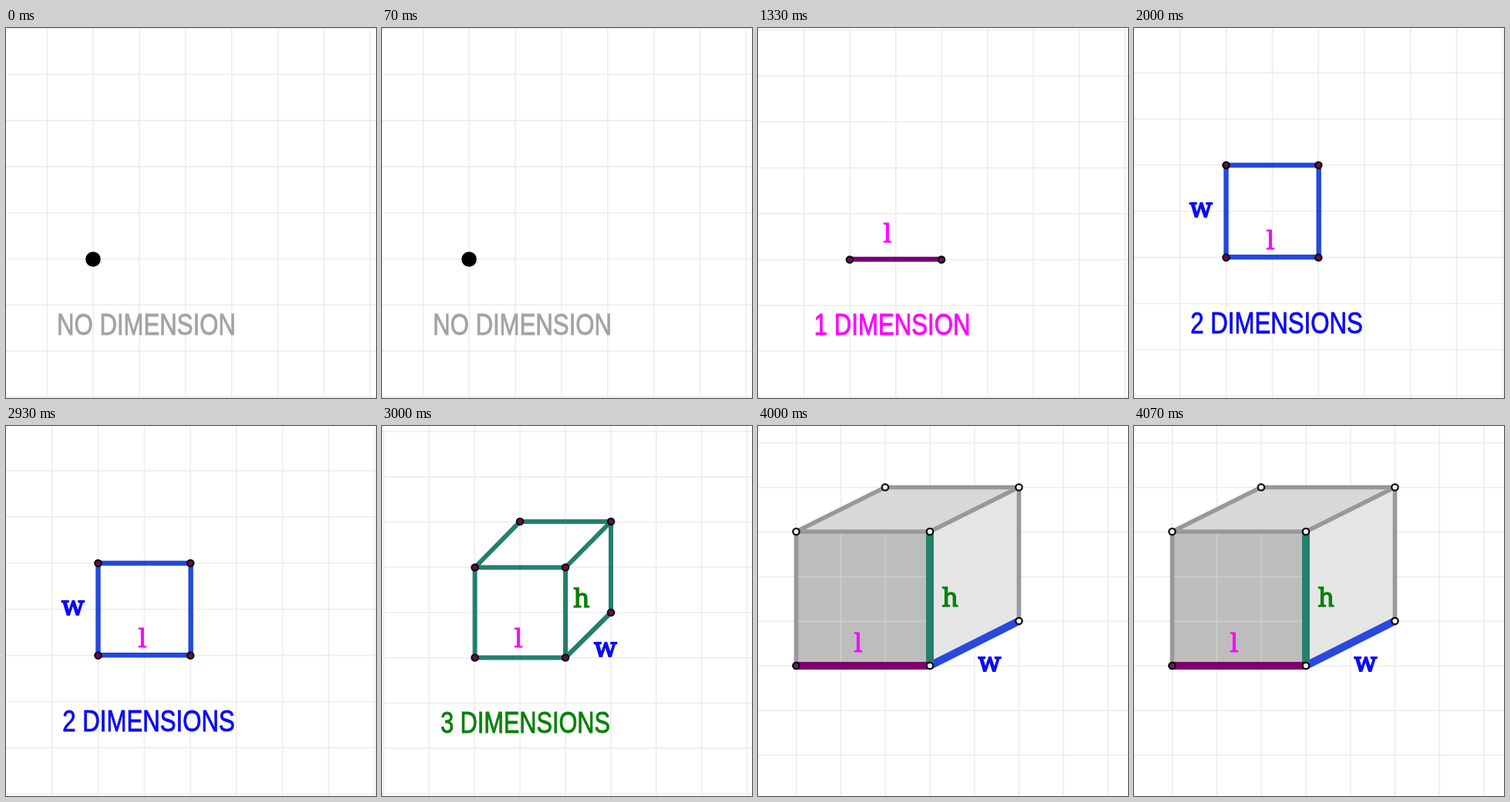
An HTML page that plays this animation: 480 px wide and 480 px high, repeating every 4990 ms.

```html
<!DOCTYPE html>
<html lang="en">
<head>
<meta charset="utf-8">
<title>Dimensions</title>
<style>
  html, body { margin: 0; width: 100%; height: 100%; overflow: hidden; background: #fff; }
  svg { display: block; width: 100%; height: 100%; }
  .slide {
    visibility: hidden;
    animation: turn 4990ms step-end infinite;
    animation-delay: calc(var(--start) - 4990ms);
  }
  @keyframes turn {
    0% { visibility: visible; }
    20.04008%, 100% { visibility: hidden; }
  }
  .grid { stroke: #ededed; stroke-width: 1.6; fill: none; }
  .edge { fill: none; stroke-linecap: round; stroke-linejoin: round; }
  .caption { font-family: "Liberation Sans", Arial, sans-serif; stroke-width: .9; }
  .label { font-family: "Noto Serif", serif; text-anchor: middle; }
</style>
</head>
<body>
<svg id="stage" viewBox="0 0 480 480"></svg>
<script>
const stage = document.getElementById('stage');
const MAGENTA = '#ff00ff', BLUE = '#0c0cf4', GREEN = '#088008';
const PURPLE = '#780070', ROYAL = '#2448de', TEAL = '#23806c', GRAY = '#989898';
const PLUM = '#6c0a4c';

function grid(x0, y0, dx, dy) {
  let d = '';
  for (let x = x0; x < 480; x += dx) d += `M${x} 0V480`;
  for (let y = y0; y < 480; y += dy) d += `M0 ${y}H480`;
  return `<path class="grid" d="${d}"/>`;
}

const edge = (d, color, width) =>
  `<path class="edge" d="${d}" stroke="${color}" stroke-width="${width}"/>`;

const face = (d, color) => `<path d="${d}" fill="${color}"/>`;

const dots = (points, fill) => points.map(([x, y]) =>
  `<circle cx="${x}" cy="${y}" r="4.2" fill="${fill}" stroke="#0a0a0a" stroke-width="2.2"/>`).join('');

// Captions share one condensed, slightly heavy lettering style.
const caption = (text, x, y, size, color) =>
  `<text class="caption" transform="translate(${x} ${y}) scale(.81 1)" font-size="${size}" fill="${color}" stroke="${color}">${text}</text>`;

const label = (text, x, y, size, color, weight) =>
  `<text class="label" x="${x}" y="${y}" font-size="${size}" fill="${color}" stroke="${color}" stroke-width="${weight}">${text}</text>`;

const length = (x, y) => label('l', x, y, 33.5, MAGENTA, .9);
const width = (x, y) => label('w', x, y, 33.5, BLUE, 1.9);
const height = (x, y) => label('h', x, y, 33, GREEN, 1.3);

const corners = (l, r, back, end, top, bottom, rear, low) =>
  [[l, top], [r, top], [back, rear], [end, rear], [end, low], [r, bottom], [l, bottom]];

const cube = corners(120.5, 238, 179, 297, 183.5, 300.5, 124, 242);
const box = corners(49.5, 223, 165, 338.5, 137, 311, 79.5, 253);

const slides = [
  grid(53.3, .5, 59.87, 59.8) +
    '<circle cx="113" cy="300" r="9.8"/>' +
    caption('NO DIMENSION', 66, 398, 38.5, '#a3a3a3'),

  grid(59.8, 2.7, 59.5, 59.55) +
    edge('M119 300H238', PURPLE, 6.4) +
    dots([[119, 300.5], [238, 300.5]], '#5c1450') +
    length(168, 278) +
    caption('1 DIMENSION', 72.8, 398, 38.5, MAGENTA),

  grid(60, 58, 59.75, 59.9) +
    edge('M119.5 178H239.7V297.2H119.5Z', ROYAL, 6.4) +
    dots([[119.5, 178], [239.3, 178], [239.3, 297.7], [119.5, 297.7]], PLUM) +
    length(177, 287) + width(87, 245) +
    caption('2 DIMENSIONS', 73.3, 396, 38.5, BLUE),

  grid(2.3, 7.2, 58.9, 58.7) +
    edge('M120.5 183.5H238V300.5H120.5ZL179 124H297V242L238 300.5M238 183.5L297 124', TEAL, 6) +
    dots(cube, PLUM) +
    length(177, 287) + height(259, 235) + width(290, 299) +
    caption('3 DIMENSIONS', 76, 398, 37.9, GREEN),

  grid(49.8, 21.8, 57.75, 57.9) +
    face('M49.5 137H223V311H49.5Z', '#bdbdbd') +
    face('M49.5 137L165 79.5H338.5L223 137Z', '#d8d8d8') +
    face('M223 137L338.5 79.5V253L223 311Z', '#e5e5e5') +
    '<path d="M107.5 137V311M165 137V311M49.5 195.5H223M49.5 253.5H223" stroke="#cecece" stroke-width="1.5"/>' +
    edge('M49.5 311V137H223L338.5 79.5V253M49.5 137L165 79.5H338.5', GRAY, 5.6) +
    edge('M223 311L338.5 253', '#2a48de', 10) +
    edge('M223 137V311', TEAL, 10) +
    edge('M49.5 311H223', '#80006e', 10) +
    dots(box.slice(0, 6), '#f0f0f0') + dots(box.slice(6), '#5a2a55') +
    length(130, 293) + height(249.5, 234) + width(300.5, 318)
];

// The first slide is stacked on top, so the loop restarts cleanly.
stage.innerHTML = slides.map((art, i) =>
  `<g class="slide" style="--start:${i * 1000}ms"><path d="M0 0H480V480H0Z" fill="#fff"/>${art}</g>`
).reverse().join('');
</script>
</body>
</html>
```
